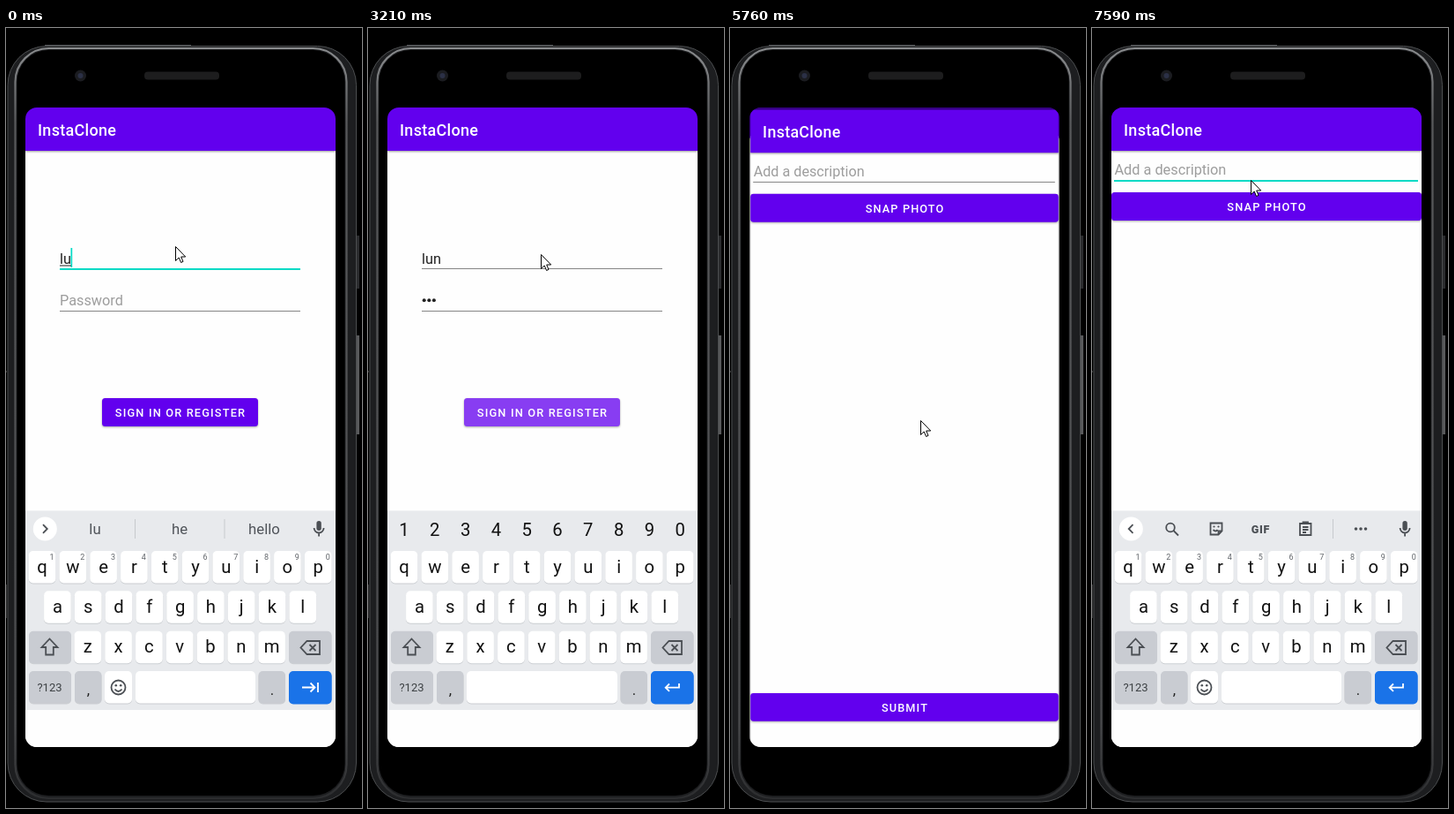
Write an HTML page that moves like this. It is 404 px wide and 883 px high and loops after 8000 ms.

```html
<!DOCTYPE html>
<html lang="en">
<head>
<meta charset="utf-8">
<title>Sign in and post</title>
<style>
  html, body { margin: 0; width: 100%; height: 100%; overflow: hidden; background: #000; }
  svg { display: block; width: 404px; height: 883px; font-family: Roboto, sans-serif; }
  .title { font-size: 18px; font-weight: 500; letter-spacing: .28px; fill: #fff; }
  .label { font-size: 12.8px; font-weight: 500; letter-spacing: 1.15px; fill: #fff; text-anchor: middle; }
  .input { font-size: 16.3px; fill: #222; }
  .hint { font-size: 16.3px; fill: #9d9d9d; }
  .key { font-size: 20.3px; fill: #111; text-anchor: middle; }
  .mark { font-size: 17px; fill: #222; text-anchor: middle; }
  .sup { font-size: 9px; fill: #5f6368; text-anchor: middle; }
  .word { font-size: 16.8px; fill: #50545a; text-anchor: middle; }
  .small { font-size: 13px; fill: #3c4043; text-anchor: middle; }
  .gif { font-size: 12.5px; font-weight: 900; letter-spacing: .8px; fill: #4b4f54; text-anchor: middle; }
  .icon { fill: none; stroke: #4b4f54; stroke-width: 1.8; }
  .white { stroke: #fff; }
  .teal { fill: #03dac5; }
  .button { fill: #6200ee; filter: drop-shadow(0 1px 1px #0005); }
  .lit { fill: #883df2; }
  .raised { filter: drop-shadow(0 3px 3px #0007); }
  .bar { fill: #6200ee; filter: drop-shadow(0 1px 1px #0006); }
</style>
</head>
<body>
<svg viewBox="0 0 404 883">
  <defs>
    <clipPath id="screen"><rect x="22" y="90" width="352" height="724" rx="13"/></clipPath>
    <clipPath id="press"><rect x="109" y="419" width="177" height="32" rx="3.5"/></clipPath>
    <linearGradient id="metal" x2="0" y2="1">
      <stop offset="0" stop-color="#8a8c8e"/>
      <stop offset=".1" stop-color="#58595b"/>
      <stop offset=".9" stop-color="#4a4b4d"/>
      <stop offset="1" stop-color="#2c2d2f"/>
    </linearGradient>
    <g id="keyboard"></g>
  </defs>

  <!-- Phone body -->
  <rect width="404" height="883"/>
  <path d="M398 235h3v60h-3z" fill="#2b2c2e"/>
  <path d="M398 348h3v112h-3z" fill="#58595b"/>
  <path d="M0 630h1v38h-1zM0 388h1v2h-1z" fill="#333"/>
  <path d="M44 19.5H210" stroke="#55575a"/>
  <rect x="2" y="20.5" width="395.5" height="855.5" rx="44" fill="#1d1e20" stroke="#4c4e50"/>
  <rect x="10.5" y="23" width="376" height="849" rx="38" fill="none" stroke="url(#metal)" stroke-width="2.2"/>
  <rect x="12.5" y="25" width="372" height="844" rx="36"/>
  <circle cx="84.5" cy="54" r="6.5" fill="#1b1c20"/>
  <circle cx="84.5" cy="54" r="3" fill="#2b3046"/>
  <rect x="157" y="49.5" width="85" height="9" rx="4" fill="#1d1d1e"/>

  <g clip-path="url(#screen)">
    <g id="login"></g>
    <use href="#keyboard" data-show="0-5760"/>
    <rect x="22" y="90" width="352" height="724" opacity=".45" data-show="5760-5910"/>
    <g id="post" data-show="5610-8000"></g>
    <use id="rising" href="#keyboard" data-show="7290-8000"/>
  </g>

  <path id="pointer" d="M.5 .5V16.5L4.2 13L6.6 18.5L9 17.4L6.7 12H11.7z" fill="#fff" stroke="#000"/>
</svg>

<script>
const LOOP = 8000;
const $ = id => document.getElementById(id);

const show = (range, body) => `<g data-show="${range}">${body}</g>`;
const text = (x, y, cls, s) => `<text x="${x}" y="${y}" class="${cls}">${s}</text>`;
const rect = (x, y, w, h, attrs, rx = 0) =>
  `<rect x="${x}" y="${y}" width="${w}" height="${h}" rx="${rx}" ${attrs}/>`;
const icon = (d, cls = '') => `<path class="icon ${cls}" d="${d}"/>`;
const dot = (x, y, r, fill) => `<circle cx="${x}" cy="${y}" r="${r}" fill="${fill}"/>`;
const caret = (x, y) => rect(x, y, 1.7, 22, 'class="teal"');
const grayLine = (x, y, w) => rect(x, y, w, 1, 'fill="#858585"');
const tealLine = (x, y, w) => rect(x, y, w, 2, 'class="teal"');
const appBar = () => rect(22, 120, 352, 714, 'fill="#fefefe"') +
  rect(22, 90, 352, 49, 'class="bar"') + text(36, 122, 'title', 'InstaClone');
const bullets = n => Array.from({length: n}, (_, i) => dot(63.7 + i * 5.6, 308.3, 2, '#222')).join('');

function loginScreen() {
  const button = (cls) => rect(109, 419, 177, 32, `class="button ${cls}"`, 3.5);
  return appBar() +
    show('0-120', text(61, 266.5, 'input', 'lu') + caret(73.5, 249) + rect(61, 268.5, 13, 1, 'fill="#222"')) +
    show('120-8000', text(61, 266.5, 'input', 'lun')) +
    show('120-400', caret(83, 249) + rect(61, 268.5, 22, 1, 'fill="#222"')) +
    show('0-400', tealLine(61, 272, 273)) +
    show('400-8000', grayLine(61, 272, 273)) +
    show('0-1070', text(61, 314, 'hint', 'Password')) +
    show('400-1070', caret(61, 297)) +
    show('1070-1190', text(61, 314, 'input', 'l') + caret(65, 297)) +
    show('1190-1340', bullets(1) + text(66.8, 314, 'input', 'u') + caret(75.7, 297)) +
    show('1340-1930', bullets(2) + text(72.4, 314, 'input', 'n') + caret(81.3, 297)) +
    show('1930-8000', bullets(3)) +
    show('400-1930', tealLine(61, 320, 273)) +
    show('0-400 1930-8000', grayLine(61, 320, 273)) +
    show('0-1930', button('')) +
    show('1930-5060', button('lit')) +
    show('5060-8000', button('raised') +
      '<g clip-path="url(#press)"><circle id="ripple" cx="206.5" cy="437" class="lit"/></g>') +
    text(198, 440, 'label', 'SIGN IN OR REGISTER');
}

function postScreen() {
  return appBar() +
    text(25.5, 166, 'hint', 'Add a description') +
    show('0-7020', grayLine(25, 172, 345)) +
    show('7020-8000', tealLine(25, 172, 345)) +
    show('7140-7590', caret(25.5, 149)) +
    rect(22, 186, 352, 32, 'class="button"', 3.5) + text(198.5, 207, 'label', 'SNAP PHOTO') +
    rect(22, 755, 352, 32, 'class="button"', 3.5) + text(198.5, 776, 'label', 'SUBMIT');
}

function keyboard() {
  const PITCH = 34.8, GRAY = '#c9ccd2', BLUE = '#1a73e8';
  const cap = (x, y, w, fill = '#fff', edge = '#cbced2') =>
    rect(x, y + 1, w, 36.5, `fill="${edge}"`, 5) + rect(x, y, w, 36.5, `fill="${fill}"`, 5);
  const row = (letters, x, y) => [...letters].map((c, i) =>
    cap(x + i * PITCH - 15.3, y, 30.6) + text(x + i * PITCH, y + 24.5, 'key', c)).join('');
  const eachDigit = fn => [...'1234567890'].map((d, i) => fn(d, 41 + i * PITCH)).join('');
  const divider = x => rect(x, 556, 1, 22, 'fill="#c6c9cd"');
  const typing = '0-670 5760-8000', secret = '670-5760';

  const mic = rect(352.4, 558, 5.4, 11, 'fill="#4b4f54"', 2.7) +
    icon('M349.6 566a5.5 5.5 0 0 0 11 0M355.1 571.5v4');
  const tools = dot(44.3, 567, 13.5, '#fff') + icon('M46.5 562.2l-4.8 4.8l4.8 4.8') +
    '<circle class="icon" cx="89" cy="565.5" r="4.8"/>' + icon('M92.5 569l5.5 5.5') +
    icon('M134.5 560.5h13v9l-4 4h-9zM147.5 569.5h-4v4M137.5 568q3 3 5 0') +
    dot(138.5, 564.5, 1.1, '#4b4f54') + dot(143.5, 564.5, 1.1, '#4b4f54') +
    text(191.5, 571.5, 'gif', 'GIF') +
    icon('M236 561h12.5v13H236zM239.5 561v-1.5h5.5v1.5M239 565h6.5M239 568h6.5M239 571h4') +
    divider(273) + [299.5, 305, 310.5].map(x => dot(x, 567, 1.8, '#4b4f54')).join('');
  const words = text(101, 573.3, 'word', 'lu') + text(197, 573.3, 'word', 'he') +
    text(293, 573.3, 'word', 'hello') + divider(146) + divider(247.5);
  const smile = cap(112, 728, 31) +
    '<circle class="icon" cx="127.5" cy="746.5" r="8"/>' + icon('M123.5 748.5q4 5 8 0') +
    dot(124.8, 744.3, 1.3, '#4b4f54') + dot(130.2, 744.3, 1.3, '#4b4f54');

  return rect(22, 546.5, 352, 225.5, 'fill="#e8eaed"') + rect(22, 772, 352, 214, 'fill="#fefefe"') +
    row('qwertyuiop', 41, 592) + row('asdfghjkl', 58.4, 637.3) + row('zxcvbnm', 92.8, 682.8) +
    show('0-520', words) +
    show('0-670', dot(44.3, 567, 13.5, '#fff') + icon('M42 562.2l4.8 4.8l-4.8 4.8')) +
    show('5760-8000', tools) +
    show(typing, mic + eachDigit((d, x) => text(x + 11, 602, 'sup', d)) + smile + cap(147, 728, 136)) +
    show(secret, eachDigit((d, x) => text(x, 575, 'key', d)) + cap(112, 728, 171)) +
    cap(26, 682.8, 48, GRAY) + icon('M49.5 691.5l9 9.5h-4.7v8.5h-8.6v-8.5h-4.7z') +
    cap(321, 682.8, 48.5, GRAY) + icon('M341.5 694h14.5v15h-14.5l-7-7.5zM344.5 698l7 7M351.5 698l-7 7') +
    cap(26, 728, 48, GRAY) + text(49.5, 751, 'small', '?123') +
    cap(78, 728, 30.5, GRAY) + text(93.5, 755, 'mark', ',') +
    cap(286.5, 728, 30.5, GRAY) + text(302, 755, 'mark', '.') +
    cap(321, 728, 48.5, BLUE, BLUE) +
    show('0-1930', icon('M336 746.5h14M345.5 741.5l5 5l-5 5M354 741v11', 'white')) +
    show('1930-8000', icon('M353 742v4.7h-15M342 742.5l-4.3 4.2l4.3 4.2', 'white'));
}

$('login').innerHTML = loginScreen();
$('post').innerHTML = postScreen();
$('keyboard').innerHTML = keyboard();

const timed = [...document.querySelectorAll('[data-show]')].map(el => ({
  el, spans: el.dataset.show.split(' ').map(s => s.split('-').map(Number))
}));

// Each step: start time, then its values
const pointerPath = [
  [0, 192, 247], [3210, 196, 256], [3330, 214, 285], [3450, 232, 317], [3600, 243, 350],
  [3750, 239, 371], [3870, 231, 398], [3990, 222, 423], [4110, 215, 441], [4230, 212, 448],
  [4540, 214, 446], [4660, 216, 444], [6470, 219, 330], [6590, 180, 184], [6740, 180, 172]
];
const rippleSteps = [[0, 75, 1], [5210, 120, 1], [5330, 120, .6]];
// New screen's scale and opacity, and how far the old one has moved up
const openSteps = [[0, 1, 1, 0], [5610, .87, .55, 3], [5760, .993, 1, 14.5], [5910, 1, 1, 0]];
const at = (steps, t) => steps.findLast(s => s[0] <= t).slice(1);

function draw(t) {
  for (const {el, spans} of timed)
    el.style.display = spans.some(([a, b]) => t >= a && t < b) ? '' : 'none';

  $('pointer').setAttribute('transform', `translate(${at(pointerPath, t)})`);

  const [r, glow] = at(rippleSteps, t);
  $('ripple').setAttribute('r', r);
  $('ripple').setAttribute('opacity', glow);

  const [scale, alpha, lift] = at(openSteps, t);
  $('post').setAttribute('transform', `translate(198 452) scale(${scale}) translate(-198 -452)`);
  $('post').setAttribute('opacity', alpha);
  $('login').setAttribute('transform', `translate(0 ${-lift})`);

  $('rising').setAttribute('y', t < 7440 ? 161 : 0);
}

const start = performance.now();
function tick() {
  draw((performance.now() - start) % LOOP);
  requestAnimationFrame(tick);
}
tick();
</script>
</body>
</html>
```
